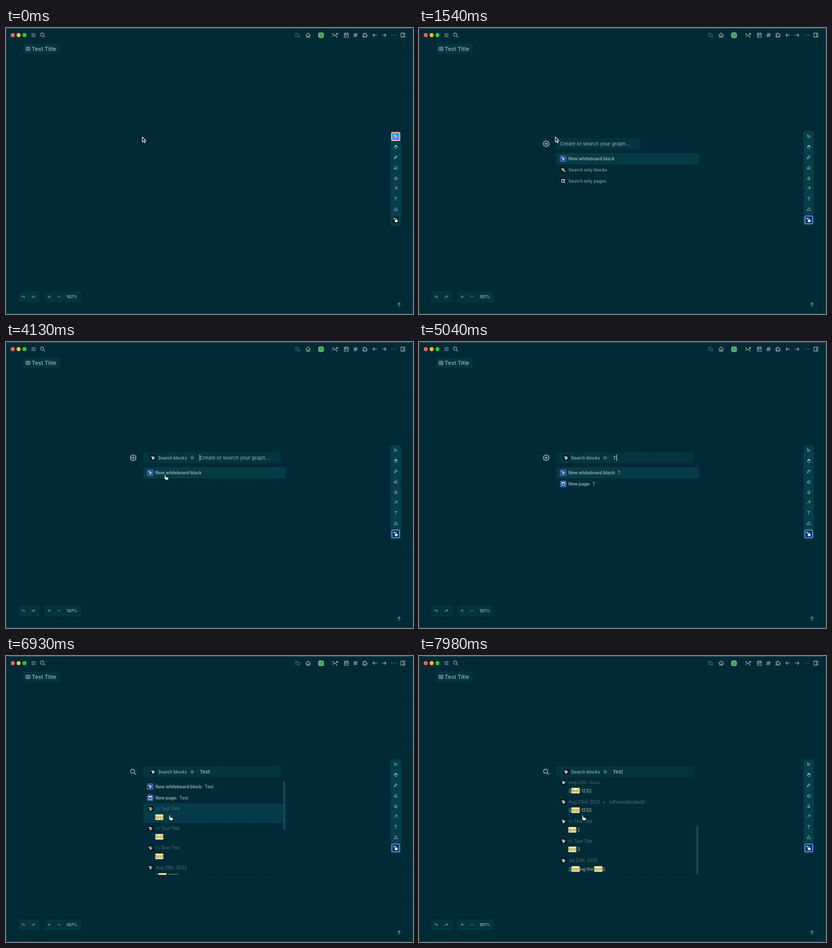
Recreate the animation shown at these times as an HTML page with a canvas. Size 800 by 562 pixels, loop 8 s.

```html
<!DOCTYPE html>
<html lang="en">
<head>
<meta charset="utf-8">
<title>Whiteboard block search</title>
<style>
  html, body { margin: 0; width: 100%; height: 100%; overflow: hidden; background: #002b36; }
  canvas { display: block; }
</style>
</head>
<body>
<canvas id="stage" width="800" height="562"></canvas>
<script>
const ctx = document.getElementById('stage').getContext('2d');
const LOOP = 8000;

const C = {
  bg: '#002b36', dot: '#0f4450', panel: '#023540', dock: '#063e4a', row: '#053b46',
  text: '#a1b1b2', soft: '#879c9f', dim: '#547177', white: '#e8eeee',
  black: '#04181f', blue: '#4a8af4', mark: '#fcec9d'
};

// Outlines on a 24 x 24 grid
const ICONS = {
  menu: 'M4 6h16M4 12h16M4 18h16',
  search: 'M3 10a7 7 0 1 0 14 0a7 7 0 1 0-14 0M21 21l-6-6',
  cloudOff: 'M3 3l18 18M9 6a6 6 0 0 1 9 5c5 0 5 6 2 6M17 18H7a4 4 0 0 1 0-9',
  home: 'M3 12l9-9l9 9M5 10v11h14V10M10 21v-6h4v6',
  chart: 'M2 18l6-7l5 4l9-10M16 5h6v6M4 5v4M2 7h4M18 17v4M16 19h4',
  calendar: 'M4 5h16v16H4zM16 2v5M8 2v5M4 11h16M8 15h3',
  hash: 'M4 9h16M4 15h16M11 4l-4 16M17 4l-4 16',
  puzzle: 'M4 7h4V5a2 2 0 0 1 4 0v2h5v5h2a2 2 0 0 1 0 4h-2v5h-5v-2a2 2 0 0 0-4 0v2H3v-5h2a2 2 0 0 0 0-4H3V7z',
  left: 'M4 12h16M4 12l6 6M4 12l6-6',
  right: 'M4 12h16M20 12l-6 6M20 12l-6-6',
  more: 'M4 12h1M12 12h1M20 12h1',
  sidebar: 'M4 4h16v16H4zM15 4v16',
  undo: 'M9 14l-4-4l4-4M5 10h10a4 4 0 0 1 0 8h-1',
  redo: 'M15 14l4-4l-4-4M19 10H9a4 4 0 0 0 0 8h1',
  plus: 'M12 5v14M5 12h14',
  minus: 'M5 12h14',
  close: 'M6 6l12 12M18 6L6 18',
  select: 'M5 4l4 16l4-5l6-2z',
  hand: 'M8 13V6a1.5 1.5 0 0 1 3 0v5V4a1.5 1.5 0 0 1 3 0v7V6a1.5 1.5 0 0 1 3 0v6V9a1.5 1.5 0 0 1 3 0v6a6 6 0 0 1-6 6h-2c-4 0-6-5-8-8a1.5 1.5 0 0 1 3-1z',
  pencil: 'M4 20l2-7L15 4l5 5l-9 9zM12 7l5 5M7 13l4 4',
  marker: 'M4 18l3-7l8-7l5 5l-7 8zM7 11l6 6M15 20h6',
  eraser: 'M19 20H9l-5-5l10-10l6 6l-9 9M9 10l6 6',
  arrow: 'M5 19L19 5M9 5h10v10',
  text: 'M5 5h14M12 5v15',
  triangle: 'M12 4L3 19h18z',
  block: 'M3 6h14M8 11h13M8 15h10M8 19h8M4 6l4 5',
  blockSearch: 'M3 6h14M7 11h6M7 15h4M4 6l3 5M13 15a3 3 0 1 0 6 0a3 3 0 1 0-6 0M18 18l4 4',
  page: 'M4 4h16v16H4zM4 6h16M9 4v7M15 4v7',
  pageSearch: 'M10 20H4V4h16v7M4 6h16M12 15a3 3 0 1 0 6 0a3 3 0 1 0-6 0M17 18l4 4',
  board: 'M2 5h20v14H2zM7 9v5h4M14 14l4-5'
};
for (const name in ICONS) ICONS[name] = new Path2D(ICONS[name]);
const ARROW = new Path2D('M0 0V10L2.4 8L4 11.5L5.8 10.6L4.2 7.3H7Z');
const POINTER = new Path2D('M1.4 0C2.6 0 2.9 1 2.9 1.6V4.2L7.2 5Q8.4 5.4 8.2 7L7.6 10H3L.2 6.6Q-.4 5.4 .8 5.5V1Q.8 0 1.4 0Z');

const RESULTS = [
  ['', 'test'], ['', 'test'], ['', 'test'],
  ['Aug 25th, 2022', '[[test-123]]'],
  ['Aug 23rd, 2022', '[[test-123]]', 'sdfnosidjfoijdsoijf'],
  ['', 'test 2'], ['', 'test 3'],
  ['Jul 27th, 2022', '[[testing the test]]']
];
const PITCH = 38.5;

const TIME = { tool: 700, open: 1000, filter: 3680, hide: 4800, found: 5430, show: 6300 };
const KEYS = [4930, 5070, 5220, 5360];
const POINTER_PATH = [[2150, 268, 214], [2520, 298, 253], [2750, 298, 253], [3200, 311, 274],
  [3750, 311, 274], [4050, 311, 261], [6300, 311, 261], [6750, 320, 313]];
const SCROLL_PATH = [[6930, 0], [7280, 68.5], [7750, 168]];

// Value of a [time, ...values] track, eased between its stops
function track(stops, t, ease = u => u) {
  const next = stops.findIndex(s => s[0] > t);
  if (next === 0) return stops[0].slice(1);
  if (next < 0) return stops[stops.length - 1].slice(1);
  const a = stops[next - 1], b = stops[next];
  const u = ease((t - a[0]) / (b[0] - a[0]));
  return a.slice(1).map((v, i) => v + (b[i + 1] - v) * u);
}
const smooth = u => u * u * (3 - 2 * u);

function box(x, y, w, h, fill, radius = 2, stroke, width = 1) {
  ctx.beginPath();
  ctx.roundRect(x, y, w, h, radius);
  if (fill) { ctx.fillStyle = fill; ctx.fill(); }
  if (stroke) { ctx.strokeStyle = stroke; ctx.lineWidth = width; ctx.stroke(); }
}

function disc(x, y, r, fill) {
  ctx.beginPath();
  ctx.arc(x, y, r, 0, Math.PI * 2);
  ctx.fillStyle = fill;
  ctx.fill();
}

function icon(name, x, y, size = 11, color = C.text, width = 2.3) {
  ctx.save();
  ctx.translate(x - size / 2, y - size / 2);
  ctx.scale(size / 24, size / 24);
  ctx.lineWidth = width;
  ctx.lineCap = ctx.lineJoin = 'round';
  ctx.strokeStyle = color;
  ctx.stroke(ICONS[name]);
  ctx.restore();
}

// Draws text centred on y and returns its right edge
function label(text, x, y, color = C.soft, size = 8.4, weight = 500) {
  ctx.font = `${weight} ${size}px Inter, sans-serif`;
  ctx.textBaseline = 'alphabetic';
  ctx.fillStyle = color;
  ctx.fillText(text, x, y + size * 0.36);
  return x + ctx.measureText(text).width;
}

function markedLabel(text, x, y) {
  for (const part of text.split(/(test)/).filter(Boolean)) {
    if (part === 'test') {
      box(x - 0.5, y - 5.5, ctx.measureText(part).width + 1, 11, C.mark, 1);
      x = label(part, x, y, '#7d7d55');
    } else {
      x = label(part, x, y, C.text);
    }
  }
}

function rowIcon(name, x, y, create) {
  if (create) box(x - 5.5, y - 5.5, 11, 11, '#12386f', 2, C.blue, 1.2);
  else box(x - 5.5, y - 5.5, 11, 11, C.black);
  icon(name, x, y, 9, C.white, 2.8);
}

function drawWindow() {
  ctx.fillStyle = C.bg;
  ctx.fillRect(0, 0, 800, 562);
  ctx.fillStyle = C.dot;
  for (let y = 37; y < 556; y += 19.55)
    for (let x = 19.3; x < 798; x += 19.55) ctx.fillRect(Math.round(x) - 0.5, Math.round(y), 1, 1);
  box(0.5, 0.5, 799, 561, null, 6, '#21434d');
  ctx.fillStyle = '#48646d';
  ctx.fillRect(6, 0, 788, 1);

  ['#fe5f57', '#febc2e', '#28c840'].forEach((color, i) => disc(13.3 + i * 11.5, 14, 3.9, color));
  icon('menu', 54, 14);
  icon('search', 72, 14);
  icon('cloudOff', 573, 14, 12, C.dim, 2);
  box(614.5, 9.5, 9.5, 9.5, '#35a853', 2, '#b5d9bd');
  [['home', 594], ['chart', 647], ['calendar', 669], ['hash', 687], ['puzzle', 706],
   ['left', 725], ['right', 743], ['more', 762], ['sidebar', 780]]
    .forEach(([name, x]) => icon(name, x, 14, 11.5));

  box(34, 31, 71, 20, C.panel);
  box(38.3, 37, 9.5, 8, '#8b9da0', 2);
  icon('board', 43, 41, 7.5, C.bg, 2.6);
  label('Test Title', 50.5, 41, C.text, 11);

  box(25, 518, 41, 21, C.panel, 3);
  icon('undo', 34, 528, 9);
  icon('redo', 54, 528, 9);
  box(76, 518, 71, 21, C.panel, 3);
  icon('plus', 85, 528, 8.5);
  icon('minus', 104, 528, 8.5);
  label('107%', 119, 528.3, C.text, 8, 600);
  disc(772.5, 544, 6, C.panel);
  label('?', 770, 544, C.text, 9, 700);
}

function drawDock(boardActive) {
  box(756, 203, 20, 185, C.dock, 3);
  if (!boardActive) box(758, 205.5, 16, 15.5, C.blue, 2, '#edc6b0', 1.8);
  ['select', 'hand', 'pencil', 'marker', 'eraser', 'arrow', 'text', 'triangle']
    .forEach((name, i) => icon(name, 766, 213 + i * 20.45, 9, i || boardActive ? C.text : C.white, 2.6));
  box(760, 371, 12, 12, C.black);
  if (boardActive) box(758.5, 369.5, 15, 15, '#0b2c4a', 2, C.blue, 2.2);
  disc(763, 374.5, 1.4, C.white);
  disc(766.5, 374.7, 1.1, C.white);
  box(764, 376.5, 6, 5, C.white, 2);
}

function drawSearchBar(t, filtered, query, browsing) {
  disc(250, 227, 9, '#02323d');
  if (browsing) icon('search', 250, 227.5, 13.5, C.text, 2.6);
  else {
    ctx.beginPath();
    ctx.arc(250, 227.5, 5.4, 0, Math.PI * 2);
    ctx.strokeStyle = '#b4c1c2';
    ctx.lineWidth = 1.4;
    ctx.stroke();
    icon('plus', 250, 227.5, 8, '#b4c1c2', 4);
  }
  box(270, 217, filtered ? 270 : 165, 21, C.panel);
  let x = 277;
  if (filtered) {
    rowIcon('block', 289, 227.5);
    label('Search blocks', 299, 227.5, C.text);
    disc(366, 227.5, 4.3, '#1b4c57');
    icon('close', 366, 227.5, 7, C.text, 3);
    x = 381;
  }
  const end = query ? label(query, x, 227.5, C.text, 9.6, 600)
                    : label('Create or search your graph...', x, 227.5, C.soft, 9.6);
  const focus = [TIME.open, TIME.filter, ...KEYS].filter(k => k <= t).pop();
  if ((t - focus) % 1000 < 500) {
    ctx.fillStyle = C.white;
    ctx.fillRect(query ? end + 0.5 : x - 0.5, 221.5, 1, 12);
  }
}

function drawList(t, filtered, query, pointerY, browsing) {
  const found = t >= TIME.found;
  const [scroll] = track(SCROLL_PATH, t);
  const rows = [['block', 'New whiteboard block', true]];
  if (query) rows.push(['page', 'New page', true]);
  else if (!filtered) rows.push(['blockSearch', 'Search only blocks'], ['pageSearch', 'Search only pages']);
  const height = found ? 184 : rows.length * 22 + 1;

  ctx.save();
  ctx.beginPath();
  ctx.rect(270, 246, 280, height);
  ctx.clip();
  ctx.translate(0, -scroll);
  if (browsing) box(270, 290, 277, PITCH, C.row, 1);
  else box(270, !filtered && pointerY > 268 ? 268 : 246, 280, 22, C.row, 2);

  rows.forEach(([name, text, create], i) => {
    const y = 256.8 + i * 22;
    rowIcon(name, 283.5, y, create);
    const right = label(query ? text + ':' : text, 293.8, y, create ? C.text : C.soft, 8.4, create ? 600 : 500);
    if (query) label(query, right + 4, y, C.text);
  });

  if (found) RESULTS.forEach(([date, text, parent], i) => {
    const y = 300.5 + i * PITCH;
    rowIcon('block', 284, y);
    if (date) label(date, 294, y, C.dim, 8.4, 400);
    else {
      icon('board', 298, y, 8, '#3d5d64', 2);
      label('Test Title', 305, y, C.dim, 8.4, 400);
    }
    if (parent) {
      label('▸', 363, y, C.dim, 7);
      label(parent, 374, y, C.dim, 8.4, 400);
    }
    markedLabel(text, 294, y + 16.5);
  });
  ctx.restore();

  ctx.fillStyle = '#01222b';
  ctx.fillRect(271, 246 + height, 277, 1);
  if (found) box(545, 246 + scroll * 0.52, 4, 96, '#104b57', 1);
}

function drawPointer(x, y, overList) {
  ctx.save();
  ctx.translate(x, y);
  ctx.fillStyle = overList ? '#f4f6f6' : '#12222a';
  ctx.strokeStyle = overList ? '#20363e' : '#e6eaea';
  ctx.lineWidth = overList ? 0.7 : 1.2;
  ctx.lineJoin = 'round';
  const shape = overList ? POINTER : ARROW;
  ctx.fill(shape);
  ctx.stroke(shape);
  ctx.restore();
}

function draw(t) {
  const filtered = t >= TIME.filter;
  const query = 'Test'.slice(0, KEYS.filter(k => k <= t).length);
  const [x, y] = track(POINTER_PATH, t, smooth);
  const browsing = t >= TIME.show && y > 290;

  drawWindow();
  drawDock(t >= TIME.tool);
  if (t >= TIME.open) {
    drawSearchBar(t, filtered, query, browsing);
    drawList(t, filtered, query, y, browsing);
  }
  if (t < TIME.hide || t >= TIME.show) drawPointer(x, y, x > 270 && y > 246);
}

const start = performance.now();
function frame() {
  draw((performance.now() - start) % LOOP);
  requestAnimationFrame(frame);
}
frame();
</script>
</body>
</html>
```
